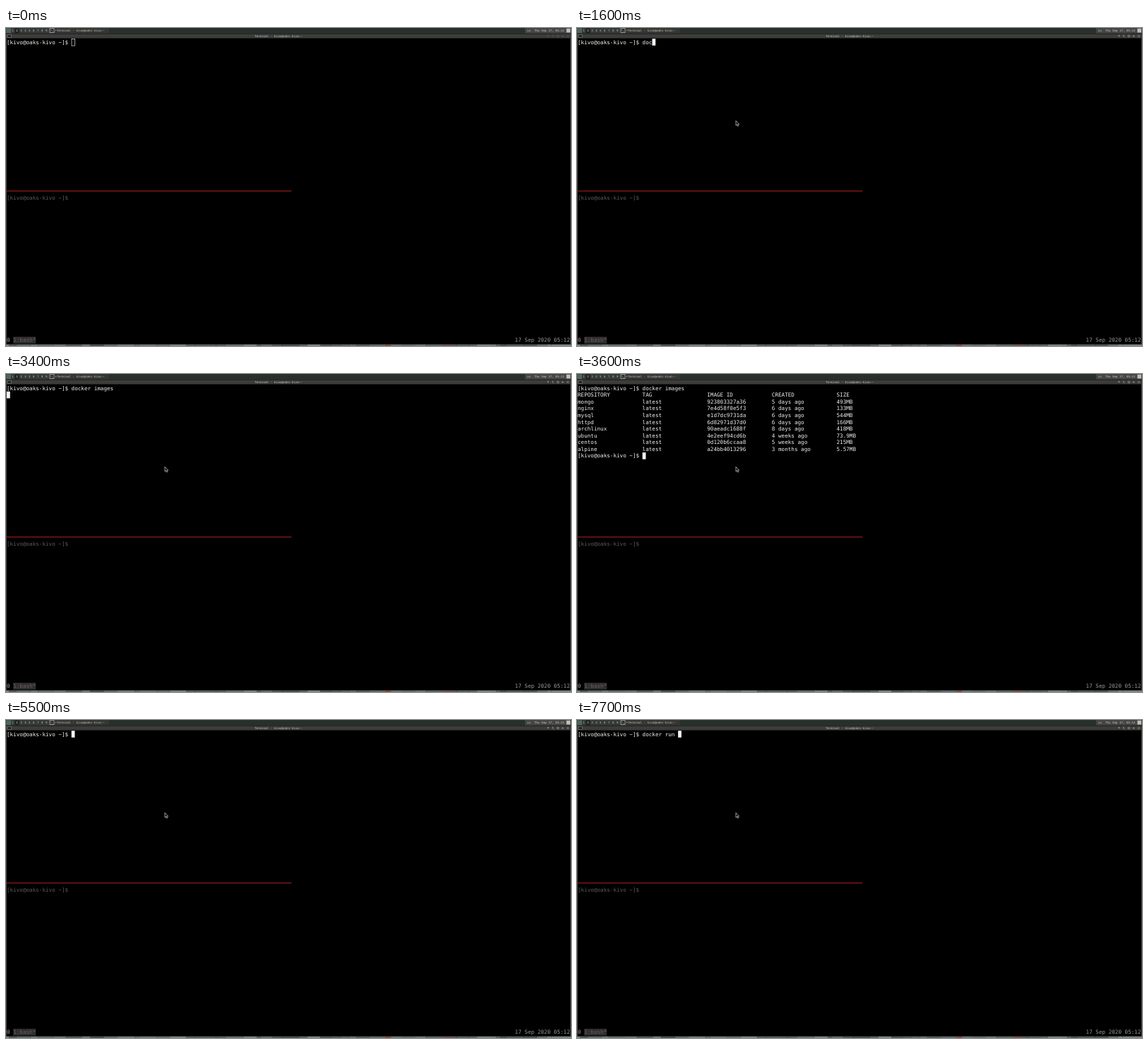
An HTML page for the animation above (8000 ms loop, 800x450 px).

```html
<!DOCTYPE html>
<html lang="en">
<head>
<meta charset="utf-8">
<title>Terminal session</title>
<style>
  html, body { margin: 0; width: 100%; height: 100%; overflow: hidden; background: #000; }
  svg { display: block; width: 800px; height: 450px; }
  text { font-family: "DejaVu Sans Mono", monospace; white-space: pre; text-rendering: geometricPrecision; }
</style>
</head>
<body>
<svg id="stage" viewBox="0 0 800 450"></svg>
<script>
const LOOP = 8000, COL = 11 / 2.4, ROW = 23 / 2.4, LEFT = 1, TOP = 15.2;
const USER = 'kivo', HOST = 'oaks-kivo';
const PROMPT = `[${USER}@${HOST} ~]$ `;
const TITLE = `Terminal - ${USER}@${HOST}:~`;
const stage = document.getElementById('stage');

function add(tag, attrs) {
  const el = document.createElementNS('http://www.w3.org/2000/svg', tag);
  for (const key in attrs) el.setAttribute(key, attrs[key]);
  return stage.appendChild(el);
}
const rect = (x, y, width, height, fill, more) => add('rect', { x, y, width, height, fill, ...more });
const path = (d, stroke, more) => add('path', { d, stroke, fill: 'none', 'stroke-width': 0.7, ...more });
function label(x, y, str, fill, size = 4.16) {
  const el = add('text', { x, y, fill, 'font-size': size });
  el.textContent = str;
  return el;
}
const colX = col => LEFT + col * COL;
const rowY = row => TOP + row * ROW;
const line = (col, row, str, fill) => label(colX(col), rowY(row) + 7.4, str, fill, 7.62);

// Desktop panel: dark strip with lighter task button and tray
rect(0, 0, 800, 8, '#28302b');
rect(0, 0, 61, 7.7, '#353a36');
rect(61, 0, 85, 7.7, '#333633');
rect(735, 0, 65, 7.7, '#444644');
rect(0.5, 0.5, 6.5, 6.5, '#50665a');
rect(12.5, 0.3, 6, 7, '#1d211f');
for (let i = 1; i <= 9; i++) label(8.3 + (i - 1) * 5.95, 5.2, i, i === 2 ? '#eee' : '#bbb');
rect(62, 0.8, 6, 5.6, '#222', { stroke: '#ccc', 'stroke-width': 0.7 });
path('M63.3 2.4l1.2 1-1.2 1M65 4.8h1.7', '#ddd', { 'stroke-width': 0.5 });
label(69.4, 5.2, '•' + TITLE, '#c8c8b8');
label(738, 5.2, 'us', '#c4c4c4');
label(748, 5.2, 'Thu Sep 17, 05:12', '#ccc');
rect(793.5, 0.8, 5.5, 5.6, '#bfc2b8');

// Window title bar
rect(0, 7.7, 800, 0.8, '#252826');
rect(0, 8.5, 800, 6, '#3c3d3b');
rect(2, 9.2, 5.4, 4.4, '#222', { stroke: '#8b8b89', 'stroke-width': 0.6 });
label(352, 13, TITLE, '#c8c8c8');
const buttons = path(
  'M766 11h3M767.5 9.8v2.4M773 10.2h2M774 10.2v2.8M775 13h1' +
  'M780.3 10.3h2.4v2.4h-2.4zM786.7 11.5h3M788.2 10v3M794 10l3 3M797 10l-3 3',
  '#aaa', { 'stroke-width': 0.6 });

// Window frame and the mottled strip of desktop below
rect(0, 14.5, 0.8, 433, '#555755');
rect(799.2, 14.5, 0.8, 433, '#555755');
rect(0, 447.3, 800, 0.6, '#3a3c3a');
let seed = 7;
const random = () => (seed = seed * 16807 % 2147483647) / 2147483647;
for (let x = 0; x < 800;) {
  const width = 4 + random() * 22, light = 28 + random() * 24;
  rect(x, 447.9, width, 2.1, `hsl(165 7% ${light}%)`);
  x += width;
}
rect(537, 448, 8, 2, '#8a443c');
rect(617, 448, 14, 2, '#79504a');

// Lower pane and status line
rect(LEFT, rowY(22) + 4.2, 88 * COL, 1, '#b3221f');
line(0, 23, PROMPT, '#5a5a5a');
line(0, 44, '0', '#9a9a9a');
rect(colX(2), rowY(44), 7 * COL, ROW, '#302d2d');
line(2, 44, '1:bash*', '#6e5f5f');
line(157, 44, '17 Sep 2020 05:12', '#9a9a9a');

const listing = [
  'REPOSITORY|TAG|IMAGE ID|CREATED|SIZE',
  'mongo|latest|923803327a36|5 days ago|493MB',
  'nginx|latest|7e4d58f0e5f3|6 days ago|133MB',
  'mysql|latest|e1d7dc9731da|6 days ago|544MB',
  'httpd|latest|6d82971d37d0|6 days ago|166MB',
  'archlinux|latest|90aeadc1688f|8 days ago|418MB',
  'ubuntu|latest|4e2eef94cd6b|4 weeks ago|73.9MB',
  'centos|latest|0d120b6ccaa8|5 weeks ago|215MB',
  'alpine|latest|a24bb4013296|3 months ago|5.57MB'
].map(row => row.split('|').map(cell => cell.padEnd(20)).join(''));

const IMAGES = 'docker images';
const imagesKeys = [1400, 1500, 1600, 1800, 1900, 2000, 2200, 2300, 2600, 2700, 2900, 3100, 3200];
const runKeys = [5600, 5700, 5800, 5900, 6200, 6400, 6500, 7100, 7200, 7500, 7700];
const ENTER = 3400, OUTPUT = 3500, CLEAR = 5300;
const typed = (str, keys, t) => str.slice(0, keys.filter(k => k <= t).length);

// Everything on the upper pane at time t; the cursor follows the last line
function screen(t) {
  if (t >= CLEAR) return [PROMPT + typed('docker run ', runKeys, t)];
  const first = PROMPT + typed(IMAGES, imagesKeys, t);
  if (t < ENTER) return [first];
  if (t < OUTPUT) return [first, ''];
  return [first, ...listing, PROMPT + typed('c', [5100], t)];
}

const lines = Array.from({ length: 11 }, (_, row) => line(0, row, '', '#f0f0f0'));
const block = rect(0, 0, COL + 0.2, ROW, '#f4f4f4');
const hollow = rect(colX(20) + 0.3, rowY(0) + 0.3, COL, ROW, 'none',
  { stroke: '#e0e0e0', 'stroke-width': 0.7 });
const mouse = path('M225 131.3v6.6l1.5-1.3 1 2.4 1.1-.5-1-2.3h2z', '#ddd', { fill: '#000' });
const show = (el, on) => el.setAttribute('visibility', on ? 'visible' : 'hidden');

function draw(t) {
  const text = screen(t), last = text.length - 1;
  lines.forEach((el, i) => {
    const str = text[i] || '';
    if (el.textContent !== str) el.textContent = str;
  });
  block.setAttribute('x', colX(text[last].length));
  block.setAttribute('y', rowY(last));
  const focused = t >= imagesKeys[0];
  show(block, focused);
  show(hollow, !focused);
  show(mouse, t >= 100);
  buttons.setAttribute('opacity', t >= 100 ? 1 : 0.25);
}

const start = performance.now();
function tick() {
  draw((performance.now() - start) % LOOP);
  requestAnimationFrame(tick);
}
tick();
</script>
</body>
</html>
```
